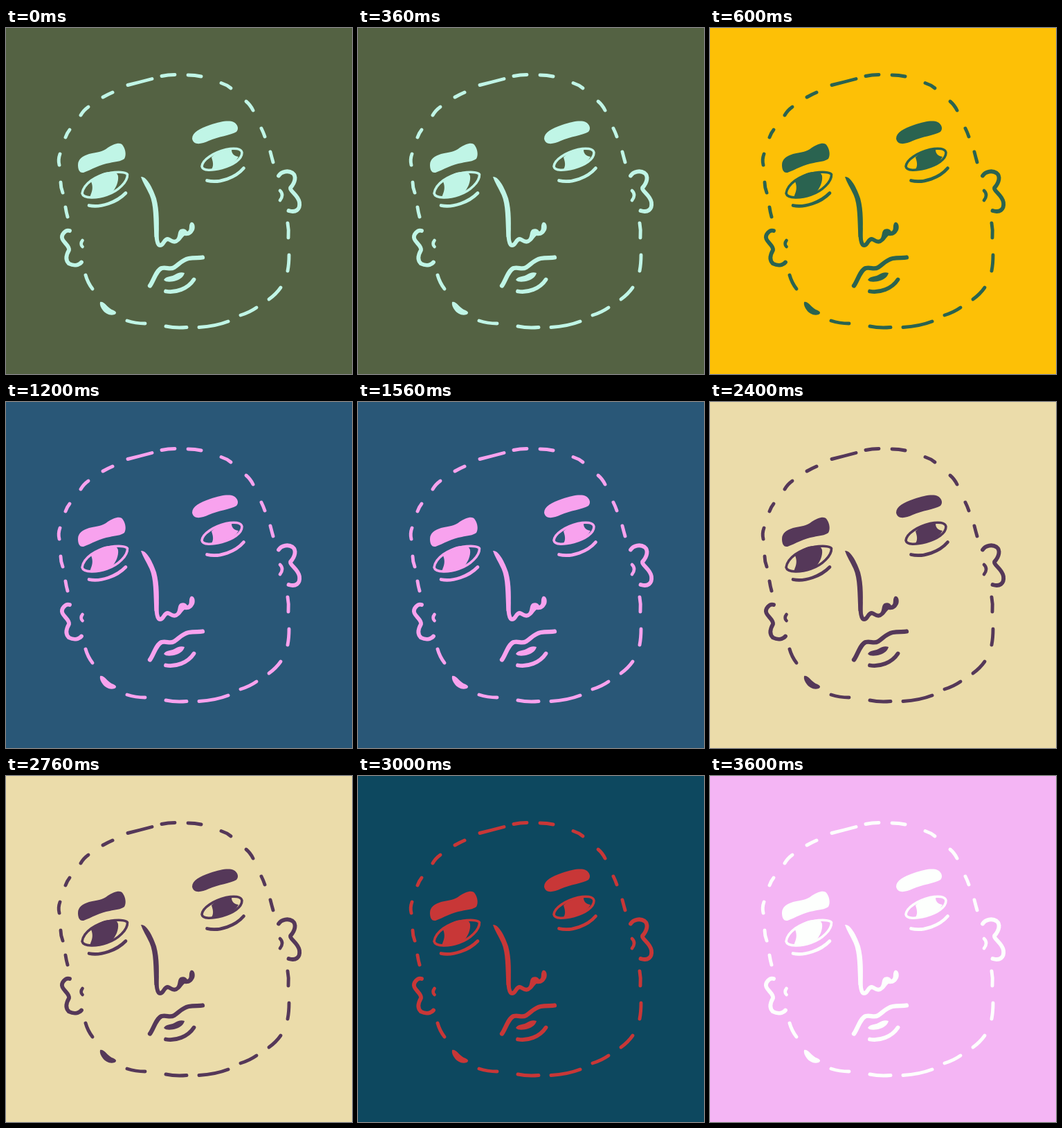
Write an HTML page with a canvas that moves like this. It is 500 px wide and 500 px high and loops after 4200 ms.

```html
<!DOCTYPE html>
<html lang="en">
<head>
<meta charset="utf-8">
<title>Colour-changing face</title>
<style>
  html, body { margin: 0; width: 100%; height: 100%; overflow: hidden; }
  canvas { display: block; width: 100vw; height: 100vh; }
</style>
</head>
<body>
<canvas id="stage" width="500" height="500"></canvas>
<script>
const ctx = document.getElementById('stage').getContext('2d');
const HOLD = 600;

// [background, ink]
const palettes = [
  ['#546243', '#c0f5e6'],
  ['#fdc006', '#2a6350'],
  ['#295777', '#f8a2ee'],
  ['#746424', '#f8d6a6'],
  ['#ebdcaa', '#553859'],
  ['#0d485f', '#c83737'],
  ['#f4b5f4', '#fdfffd']
];

// Head outline: each dash is a slightly curved brush mark.
const dashes = [
  'M176 82.5Q194 78 211 73.5',
  'M225 69.5Q234 67.5 244 67.5', 'M263 68Q273 68 282 70',
  'M311 79.5Q319 82 325 87', 'M347 106Q353 111 357 119',
  'M369 145Q372 151 374 157', 'M382 179Q384 187 386 194',
  'M407 282Q409 292 408 303', 'M409 328Q409 341 407 351',
  'M397 375Q390 385 380 392', 'M362 404Q352 411 339 415',
  'M279 432.5Q303 431 321 424',
  'M261 432.5Q245 434 231 431', 'M201 427Q187 427 175 423',
  'M125 377Q118 368 115 357', 'M89 273Q87 266 86 259',
  'M82 238Q79 230 79 223', 'M77 198Q75 190 78 182',
  'M86 158Q88 152 92 147', 'M108 126Q112 119 119 114',
  'M140 100Q147 96 154 93'
];

const strokes = {
  3.6: [
    'M110 239C112 225 130 213 150 209.500C162 207.500 173 208 175.500 211.500C176 222 162 236 146 241C132 246 112 247 110 239Z',
    'M283 200C284 190 300 180 318 175.500C330 173 340 174 341 180C341 190 328 198 312 202.500C298 206 284 207 283 200Z'
  ],
  4.7: [
    'M120 256.500C137 260 160 252 173 238.500',
    'M290.500 220.500C309 225 332 216 343.500 202.500',
    'M396 235C400.500 239 399.500 245 396 249',
    'M110.500 307C108 310 108 314 110.500 316'
  ],
  5.8: [
    'M394 213.500C398 207 408 205.500 414 209.500C420 214 418 223 411 231C410 236 422 241 424 252C425.500 263 418 267 408.500 264',
    'M92 293C86 291 79 299 81.500 305C84 311 92 315 91 321C87 328 85 335 91 340.500C98 344 105 343 109 338.500',
    'M217.500 290C217 302 218 315 223.500 314C229 312 228 305 234 305C238 306 240 310 245 308.500',
    'M231 380.500C245 383 263 377 271.500 363.500'
  ],
  6.3: ['M208 372.500C213 366 217 350 225 347C233 345 236 350 243 346C250 342 254 335 264 333C272 331.500 279 332.500 284 331.500']
};

const fills = [
  // brows
  'M104 198C104 189 111 185 120 182C133 179 140 179 147 173C156 167 166 164 169 170C173 176 174 184 171 189C166 193 158 193 150 195C136 197 123 205 112 209C106 210 104 204 104 198Z',
  'M269 160C269 151 280 145 295 140C310 135 322 133 329 136C335 139 337 146 333 150C325 155 306 157 293 163C282 168 271 170 269 160Z',
  // irises
  'M123 222C130 214 140 208 150 208C156 207 161 209 162 214C163 222 159 232 152 239C145 243 132 246 122 244C121 241 128 234 123 222Z',
  'M297 187C303 180 318 174 326 176C326 181 329 185 336 186C331 196 315 204 296 205C300 201 300 195 297 187Z',
  // nose bridge and nostril
  'M195 215C203 214 212 231 217 246C222 264 221 285 220.500 306L214.500 302C213 276 214 256 207.500 241C203 231 198 224 195 215Z',
  'M244 306C250 304 247 294 252 291C257 289 260 291 262 294C267 292 263 285 267 281C272 279 274 287 272 292C269 298 265 301 258 300C254 303 252 309 246 311Z',
  // inner lip
  'M228 364C232 358 237 360 243 357C248 354 253 352 258 354C257 359 252 363 246 365C240 367 231 368 228 364Z',
  // heavy chin mark
  'M136 396C141 394 146 403 153 407C159 409 161 412 157 414C150 416 144 413 140 408C137 404 135 400 136 396Z'
];

const toPath = d => new Path2D(d);
const fillPaths = fills.map(toPath);
const strokeSets = [[4.9, dashes], ...Object.entries(strokes)]
  .map(([width, list]) => [Number(width), list.map(toPath)]);

ctx.lineCap = ctx.lineJoin = 'round';

function draw(time) {
  const [background, ink] = palettes[Math.floor(time / HOLD) % palettes.length];
  ctx.fillStyle = background;
  ctx.fillRect(0, 0, 500, 500);
  ctx.fillStyle = ctx.strokeStyle = ink;
  fillPaths.forEach(path => ctx.fill(path));
  for (const [width, paths] of strokeSets) {
    ctx.lineWidth = width;
    paths.forEach(path => ctx.stroke(path));
  }
}

function tick() {
  draw(performance.now());
  requestAnimationFrame(tick);
}
tick();
</script>
</body>
</html>
```
